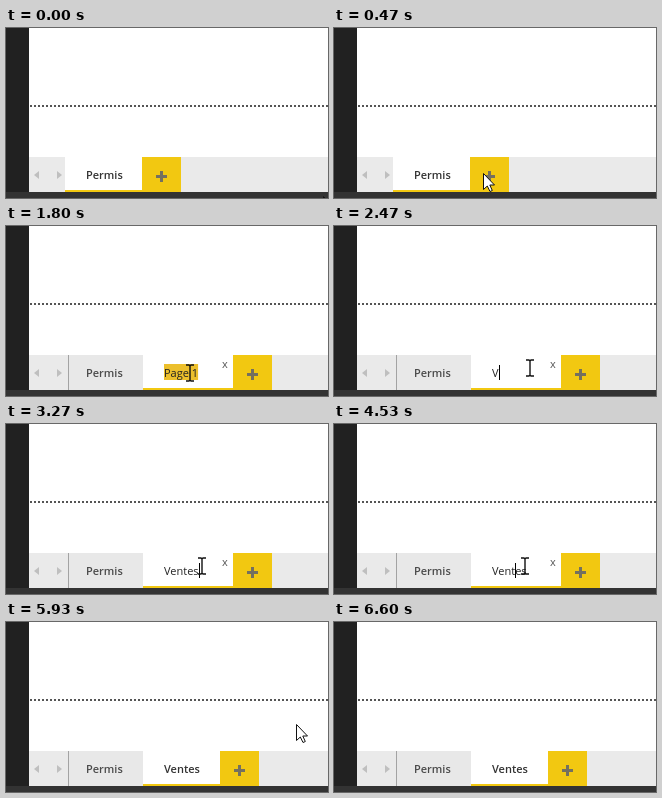
These frames come from a looping animation (322 px wide and 170 px high, 7070 ms). An HTML page:

```html
<!DOCTYPE html>
<html lang="fr">
<head>
<meta charset="utf-8">
<style>
  html, body { margin: 0; width: 100%; height: 100%; overflow: hidden; background: #fff; }
  svg { display: block; width: 322px; height: 170px; }
  text { font: 600 11px "Open Sans", sans-serif; fill: #333; white-space: pre; }
  .edit { font-weight: 400; fill: #222; }
  #close { font-weight: 400; fill: #555; }
</style>
</head>
<body>
<svg viewBox="0 0 322 170">
  <rect width="322" height="170" fill="#fff"/>
  <path d="M24 78H322" stroke="#555" stroke-width="2" stroke-dasharray="2"/>
  <rect x="23" y="129" width="299" height="35" fill="#eaeaea"/>
  <path d="M33 143v8l-5-4zM51 143v8l5-4z" fill="#bfbfbf"/>

  <rect id="firstTab" x="59" y="129" width="77" height="35" fill="#fff"/>
  <rect id="firstLine" x="59" y="162" width="77" height="2" fill="#f2c811"/>
  <path id="borders" d="M62.5 129V164" stroke="#a3a3a3"/>
  <text id="firstName" x="80" y="151">Permis</text>

  <g id="newTab">
    <rect class="wide" x="137" y="129" height="35" fill="#fff"/>
    <rect class="wide" x="137" y="162" height="2" fill="#f2c811"/>
    <rect id="selection" x="158" y="138" height="16" fill="#ecbf2c"/>
    <text id="name" x="158" y="151"></text>
    <path id="caret" d="M.5 139v15" stroke="#000"/>
    <text id="close" y="142">x</text>
  </g>

  <g id="add">
    <rect y="129" width="39" height="35" fill="#f2c811"/>
    <path d="M14 148.5h11M19.5 143v11" stroke="#74705f" stroke-width="3"/>
  </g>

  <rect width="23" height="164" fill="#212121"/>
  <rect y="164" width="322" height="6" fill="#333"/>

  <path id="arrow" d="M.5 .5V16.5L4.3 13 7 18.5 9.3 17.5 6.8 12H11.5Z" fill="#fff" stroke="#111"/>
  <path id="beam" d="M-4 -8h3l1 1 1-1h3M0-7V7M-4 8h3l1-1 1 1h3" fill="none" stroke="#111" stroke-width="1.4"/>
</svg>
<script>
const $ = id => document.getElementById(id);
const show = (id, on) => $(id).setAttribute('visibility', on ? 'inherit' : 'hidden');
const move = (id, x, y) => $(id).setAttribute('transform', `translate(${x} ${y})`);

const LOOP = 7070;
// Times below are in ticks of 1/15 s.
const CREATE = 12, EDIT = 27, CLICK = 64, COMMIT = 81;
const KEYS = [37, 39, 42, 44, 46, 49];

// Pointer moves: start, end, quadratic curve, eased or not.
const MOVES = [
  [0, 7, [317, 168], [200, 122], [149, 145], true],
  [16, 20, [149, 145], [158, 144], [175, 144], true],
  [EDIT, 30, [184, 147], [190, 144], [196, 142], true],
  [55, 65, [196, 142], [130, 134], [184, 143], true],
  [67, 78, [184, 143], [220, 139], [324, 127], false],
  [89, 99, [290, 102], [200, 29], [75, 172], false]
];

function pointerAt(tick) {
  const [start, end, a, b, c, eased] = MOVES.findLast(m => m[0] <= tick);
  let p = Math.min(1, (tick - start) / (end - start));
  if (eased) p *= p * (3 - 2 * p);
  const q = 1 - p;
  return a.map((v, i) => Math.round(q * q * v + 2 * p * q * b[i] + p * p * c[i]));
}

function render(tick) {
  const [x, y] = pointerAt(tick);
  const created = tick >= CREATE;
  const editing = tick >= EDIT && tick < COMMIT;
  const typed = KEYS.filter(k => k <= tick).length;
  const width = editing ? 90 : 77;

  $('firstTab').setAttribute('fill', created ? '#e8e8e8' : '#fff');
  $('firstTab').setAttribute('x', created ? 62 : 59);
  $('firstTab').setAttribute('width', created ? 75 : 77);
  $('firstName').style.fill = created ? '#4a4a4a' : '#333';
  show('firstLine', !created);
  show('borders', created);
  show('newTab', created);

  for (const el of document.querySelectorAll('.wide')) el.setAttribute('width', width);
  const name = $('name');
  name.textContent = typed ? 'Ventes'.slice(0, typed) : 'Page 1';
  name.setAttribute('class', editing ? 'edit' : '');
  $('selection').setAttribute('width', name.getComputedTextLength());
  show('selection', editing && !typed);

  const caretIndex = tick >= CLICK ? 4 : typed;
  if (caretIndex) move('caret', 158 + Math.round(name.getSubStringLength(0, Math.min(caretIndex, name.textContent.length))), 0);
  show('caret', editing && typed);

  $('close').setAttribute('x', 126 + width);
  show('close', tick > CREATE && tick < COMMIT && x < 137 + width);
  move('add', created ? 137 + width : 136, 0);

  const beam = editing && x < 201;
  show('beam', beam);
  show('arrow', !beam);
  move(beam ? 'beam' : 'arrow', x, y);
}

function frame(now) {
  const t = now % LOOP;
  render(Math.floor((Math.floor(t / 10) + 0.5) * 0.15));
  requestAnimationFrame(frame);
}
frame(performance.now());
</script>
</body>
</html>
```
